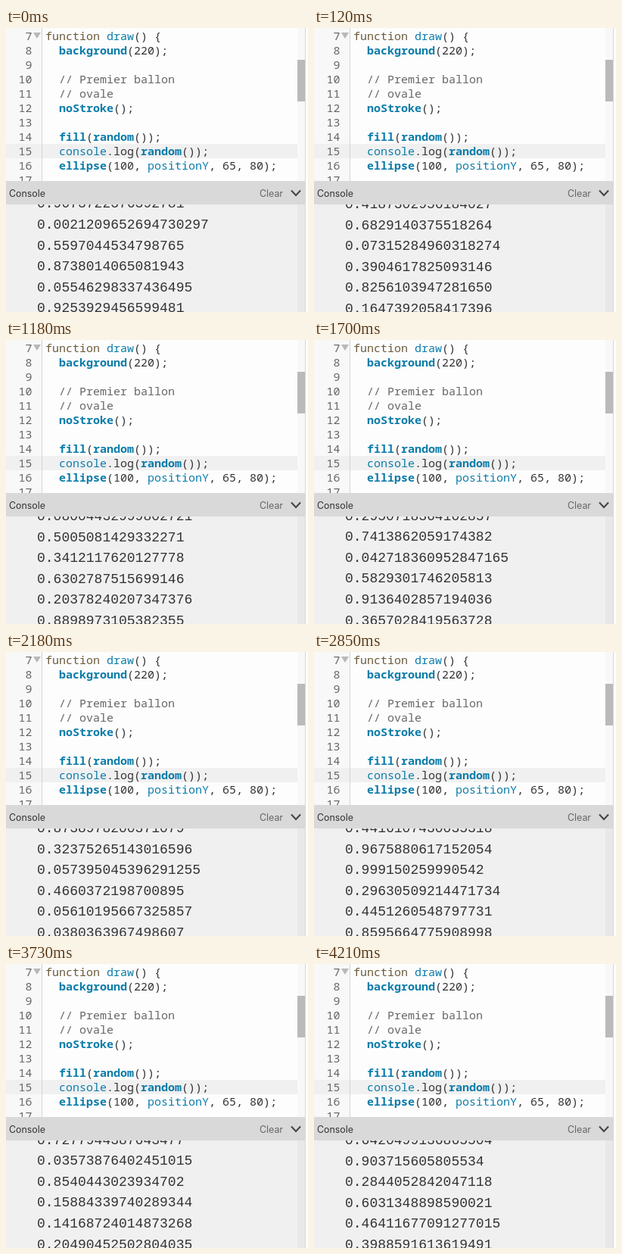
An HTML page with a canvas for the animation above (4.58 s loop, 399 by 375 pixels).

```html
<!DOCTYPE html>
<html lang="fr">
<head>
<meta charset="utf-8">
<title>Console</title>
<style>
  html, body { margin: 0; width: 100%; height: 100%; overflow: hidden; background: #fdfdfd; }
  canvas { display: block; }
</style>
</head>
<body>
<canvas id="stage" width="399" height="375"></canvas>
<script>
const ctx = document.getElementById('stage').getContext('2d');
const LOOP = 4580;
const INK = '#333', BLUE = '#0b7ca9', GRAY = '#666', BROWN = '#6b5a3c';
const CODE_FONT = '15px "Noto Sans Mono", monospace';
const LABEL_FONT = '12.4px Inter, sans-serif';
const CHAR = 9, LINE = 19, FIRST_LINE = 7;
const LOG_TOP = 237.3, LOG_LINE = 27.6;

// Each code line is a list of runs: [text, style]
const call = name => [name, 'call'];
const code = [
  [['function ', 'keyword'], ['draw', 'name'], ['() {']],
  [['  '], call('background'), ['(220);']],
  [],
  [['  // Premier ballon', 'comment']],
  [['  // ovale', 'comment']],
  [['  '], call('noStroke'), ['();']],
  [],
  [['  '], call('fill'), ['('], call('random'), ['());']],
  [['  '], ['console', 'name'], ['.log('], call('random'), ['());']],
  [['  '], call('ellipse'), ['(100, '], ['positionY', 'name'], [', 65, 80);']],
  []
];
const colors = { keyword: BROWN, name: BLUE, call: BLUE, comment: GRAY };

// Console output: start time, scroll offset, visible rows
const outputs = [
  [0, 0, '0.9073722376392781 0.0021209652694730297 0.5597044534798765 0.8738014065081943 0.05546298337436495 0.9253929456599481'],
  [120, 0.65, '0.4187302956184027 0.6829140375518264 0.07315284960318274 0.3904617825093146 0.8256103947281650 0.1647392058417396'],
  [640, 0.3, '0.5311973802962131 0.9503718590474418 0.1952632528228937 0.7179796851864954 0.7491320566508508 0.9038797985870458'],
  [1180, 0.65, '0.08004432999802721 0.5005081429332271 0.3412117620127778 0.6302787515699146 0.20378240207347376 0.8898973105382355'],
  [1700, 0.3, '0.2950718364102857 0.7413862059174382 0.042718360952847165 0.5829301746205813 0.9136402857194036 0.3657028419563728'],
  [2180, 0.65, '0.8738978200371079 0.32375265143016596 0.057395045396291255 0.4660372198700895 0.05610195667325857 0.0380363967498607'],
  [2730, 0.65, '0.4416107430035318 0.9675880617152054 0.999150259990542 0.29630509214471734 0.4451260548797731 0.8595664775908998'],
  [3210, 0.65, '0.6183920471856302 0.1520846379201758 0.7039461825703948 0.038261750492836174 0.8641937205184639 0.5274910368251907'],
  [3730, 0.3, '0.7277944387643477 0.03573876402451015 0.8540443023934702 0.15884339740289344 0.14168724014873268 0.20490452502804035'],
  [4210, 0.65, '0.6420499136865504 0.903715605805534 0.2844052842047118 0.6031348898590021 0.46411677091277015 0.3988591613619491']
].map(([start, shift, text]) => ({ start, shift, rows: text.split(' ') }));

function box(x, y, w, h, color) {
  ctx.fillStyle = color;
  ctx.fillRect(x, y, w, h);
}

function label(text, x, y, font, color) {
  ctx.font = font;
  ctx.fillStyle = color;
  ctx.fillText(text, x, y);
}

function polygon(points, color) {
  ctx.fillStyle = color;
  ctx.beginPath();
  points.forEach(([x, y]) => ctx.lineTo(x, y));
  ctx.fill();
}

function drawEditor() {
  box(0, 0, 399, 202, '#fdfdfd');
  box(0, 0, 47, 202, '#f8f8f8');
  box(0, 153, 385, LINE, '#f0f0f0');
  box(47, 0, 1, 202, '#d4d4d4');

  code.forEach((runs, i) => {
    const y = 16 + i * LINE;
    const number = String(FIRST_LINE + i);
    label(number, 34.5 - number.length * CHAR, y, CODE_FONT, GRAY);
    let x = 52;
    for (const [text, style] of runs) {
      const font = style === 'call' ? '600 ' + CODE_FONT : CODE_FONT;
      label(text, x, y, font, colors[style] || INK);
      x += text.length * CHAR;
    }
  });
  polygon([[36, 6], [46, 6], [41, 14]], '#b8b8b8');

  box(385, 0, 10, 202, '#f8f8f8');
  box(385, 42, 10, 55, '#bababa');
}

function drawConsole({ shift, rows }) {
  box(0, 202, 395, 173, '#f0f0f0');
  box(385, 233, 10, 142, '#e8e8e8');
  rows.forEach((text, i) => {
    label(text, 41, LOG_TOP + shift + i * LOG_LINE, '18px "Liberation Mono", monospace', INK);
  });

  box(0, 202, 395, 31, '#d9d9d9');
  label('Console', 4, 223, LABEL_FONT, INK);
  label('Clear', 335, 223, LABEL_FONT, GRAY);
  ctx.strokeStyle = '#444';
  ctx.lineWidth = 2;
  ctx.beginPath();
  ctx.moveTo(377, 214.5);
  ctx.lineTo(383, 221);
  ctx.lineTo(389, 214.5);
  ctx.stroke();
}

function draw(now) {
  const t = now % LOOP;
  drawEditor();
  drawConsole(outputs.findLast(output => output.start <= t));
  box(395, 0, 1, 375, '#d8d8d8');
  box(396, 0, 3, 375, '#fdfdfd');
  // Pointer tip grazing the top edge
  if (t >= 2550 && t < 2850) polygon([[355, 0], [365, 0], [362, 2], [357, 2]], INK);
  requestAnimationFrame(draw);
}
requestAnimationFrame(draw);
</script>
</body>
</html>
```
